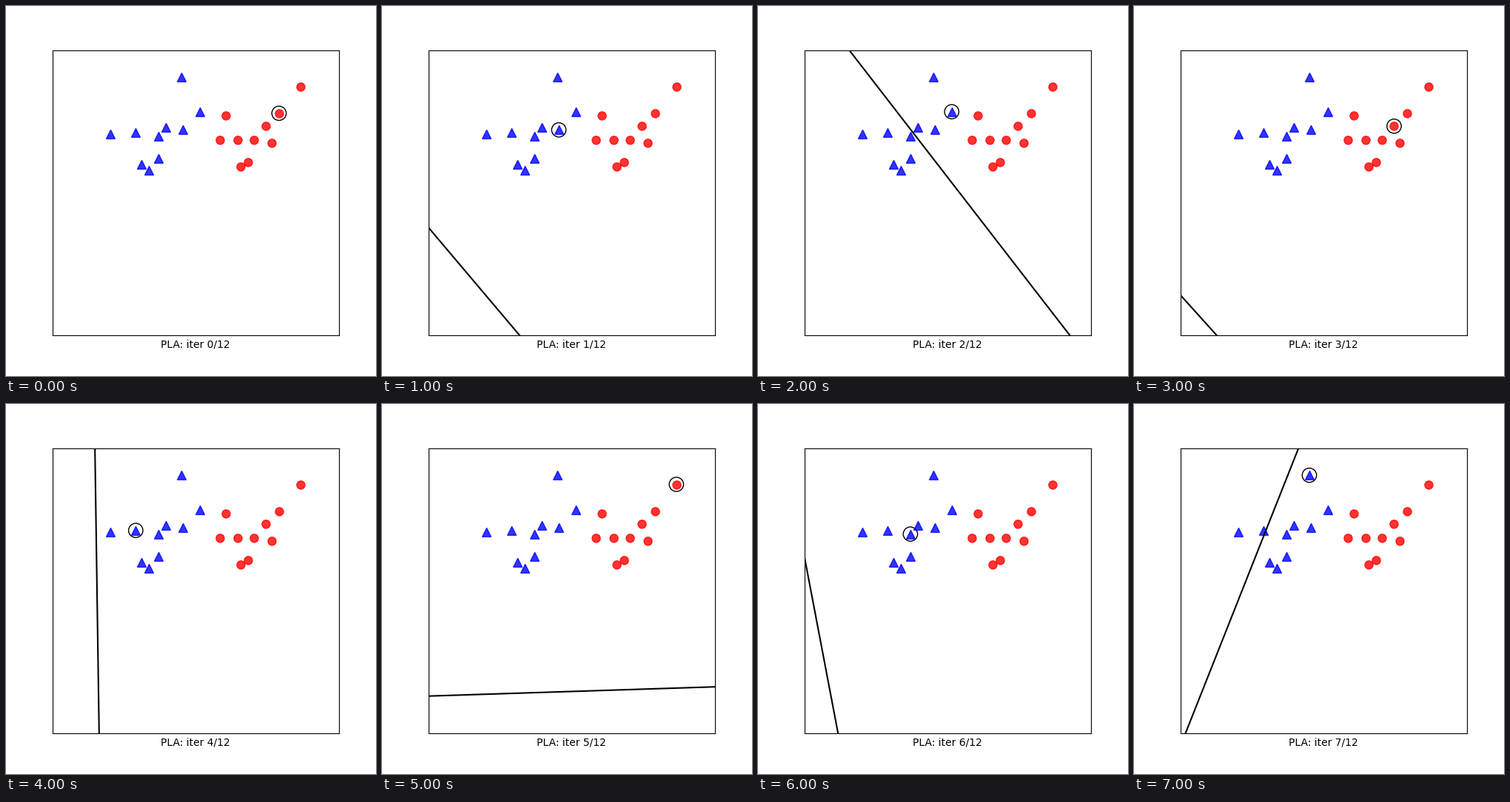
A matplotlib script that plays this animation: 500 px wide and 500 px high, repeating every 8000 ms.

```python
import numpy as np
import matplotlib.pyplot as plt
from matplotlib.animation import FuncAnimation

STEPS = 8
LAST_ITER = 12
SPAN = np.array([-100, 100])


def cluster(center, n=10):
    """Correlated Gaussian points, covariance [[.3, .2], [.2, .3]]."""
    axes = np.array([[-0.5, -0.5], [-np.sqrt(0.05), np.sqrt(0.05)]])
    return np.random.randn(n, 2) @ axes + center


np.random.seed(2)
blue = cluster((2, 2))
red = cluster((4, 2))
points = np.vstack((blue, red))
labels = np.repeat([1, -1], 10)

# Perceptron updates: each misclassified point shifts the weights.
picks = [14, 4, 2, 10, 8, 16, 0, 1]
weights = [np.array([1.7312, 1.582, 0.0196])]
for k in picks[:-1]:
    weights.append(weights[-1] + labels[k] * np.array([1, *points[k]]))

fig, ax = plt.subplots(figsize=(5, 5), dpi=100)
ax.plot(*blue.T, 'b^', markersize=8, alpha=0.8)
ax.plot(*red.T, 'ro', markersize=8, alpha=0.8)
boundary, = ax.plot([], [], 'k')
ring = ax.add_artist(plt.Circle((0, 0), 0.15, color='k', fill=False))
ax.axis([0, 6, -2, 4])
ax.set_xticks([])
ax.set_yticks([])


def update(i):
    w0, w1, w2 = weights[i]
    boundary.set_data(SPAN, -(w0 + w1 * SPAN) / w2)
    ring.center = tuple(points[picks[i]])
    ax.set_xlabel(f'PLA: iter {i}/{LAST_ITER}')
    return boundary, ring


anim = FuncAnimation(fig, update, frames=STEPS, interval=1000,
                     repeat=True, repeat_delay=0)
plt.show()
```
